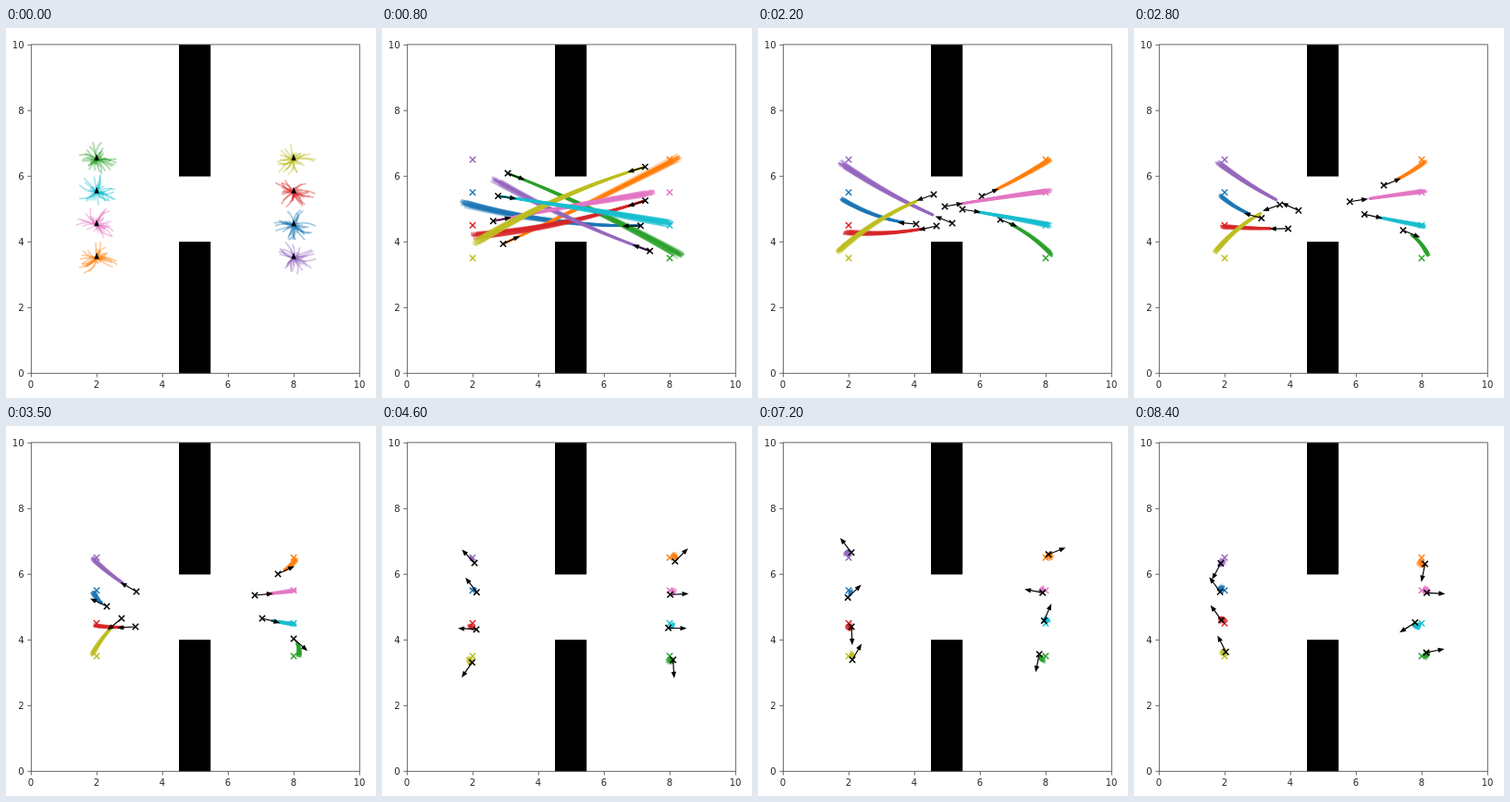
An HTML page with a canvas for the animation above (8500 ms loop, 400 by 400 pixels).

```html
<!DOCTYPE html>
<html lang="en">
<head>
<meta charset="utf-8">
<title>Robots swapping sides through a gap</title>
<style>
  html, body { margin: 0; width: 100%; height: 100%; overflow: hidden; background: #fff; }
  svg, canvas { position: absolute; left: 0; top: 0; width: 400px; height: 400px; }
  text { font: 10px "DejaVu Sans", sans-serif; fill: #2a2a2a; }
</style>
</head>
<body>
<svg id="axes" viewBox="0 0 400 400">
  <path d="M187 18h34.2v142.5H187zM187 231h34.2v142.5H187z"/>
  <rect x="27.3" y="17.9" width="355" height="355.4" fill="none" stroke="#555" stroke-width=".9"/>
</svg>
<canvas id="stage" width="400" height="400"></canvas>
<script>
const LOOP = 8500, STEP = 100, LINES = 30, ARROW = 20;
const ctx = document.getElementById('stage').getContext('2d');
const mix = (a, b, u) => a + (b - a) * u;
const clamp = (v, lo, hi) => Math.min(hi, Math.max(lo, v));
const plot = (x, y) => [27 + 35.5 * x, 373 - 35.5 * y];

function drawAxes() {
  let marks = '';
  for (let v = 0; v <= 10; v += 2) {
    const [x, y] = plot(v, v);
    marks += `<path d="M${x + .3} 373.5v4M27.3 ${y + .3}h-4" stroke="#555" stroke-width=".9"/>
      <text x="${x}" y="389" text-anchor="middle">${v}</text>
      <text x="19.5" y="${y + 3.6}" text-anchor="end">${v}</text>`;
  }
  document.getElementById('axes').insertAdjacentHTML('beforeend', marks);
}

function random(seed) {
  return () => {
    seed = (seed * 16807) % 2147483647;
    return seed / 2147483647;
  };
}

// Each robot crosses to the other side by way of two points, then hovers around its goal.
function robot(color, side, fromLane, toLane, inGap, beyond, index) {
  const rnd = random(4201 * (index + 2));
  const start = plot(side, fromLane), goal = plot(10 - side, toLane);
  const knots = [[0, start], [2200, inGap], [3500, beyond]];
  for (let t = 4600; t <= 8400; t += 950) {
    const a = rnd() * 2 * Math.PI, d = 4 + 4 * rnd();
    knots.push([t, [goal[0] + d * Math.cos(a), goal[1] + d * Math.sin(a)]]);
  }
  return { color, start, goal, knots };
}

const robots = [
  ['#1f77b4', 8, 4.5, 5.5, [171, 212], [109, 195]],
  ['#ff7f0e', 2, 3.5, 6.5, [242, 182], [294, 160]],
  ['#2ca02c', 2, 6.5, 3.5, [262, 207], [311, 230]],
  ['#d62728', 8, 5.5, 4.5, [193, 214], [140, 217]],
  ['#9467bd', 8, 3.5, 6.5, [210, 211], [141, 179]],
  ['#e377c2', 2, 4.5, 5.5, [202, 193], [269, 183]],
  ['#bcbd22', 8, 6.5, 3.5, [190, 180], [125, 208]],
  ['#17becf', 2, 5.5, 4.5, [221, 196], [277, 208]]
].map((spec, i) => robot(...spec, i));

// Smooth curve through the knots, at rest at the start
function positionAt({ knots }, t) {
  const last = knots.length - 1;
  let i = 0;
  while (i < last - 1 && t >= knots[i + 1][0]) i++;
  const [t0, p] = knots[i], [t1, q] = knots[i + 1];
  const u = clamp((t - t0) / (t1 - t0), 0, 1), v = 1 - u;
  const slope = (k, axis) => {
    if (k === 0) return 0;
    const [ta, a] = knots[k - 1], [tb, b] = knots[Math.min(last, k + 1)];
    return (b[axis] - a[axis]) / (tb - ta);
  };
  return [0, 1].map(axis =>
    p[axis] * (1 + 2 * u) * v * v + q[axis] * u * u * (3 - 2 * u) +
    (t1 - t0) * u * v * (slope(i, axis) * v - slope(i + 1, axis) * u));
}

function poseAt(r, t) {
  const [x, y] = positionAt(r, t);
  const [ax, ay] = positionAt(r, t - 20), [bx, by] = positionAt(r, t + 20);
  return { x, y, angle: Math.atan2(by - ay, bx - ax), speed: Math.hypot(bx - ax, by - ay) * 25 };
}

function cross([x, y], color) {
  const s = 3.2;
  ctx.strokeStyle = color;
  ctx.lineWidth = 1.5;
  ctx.beginPath();
  ctx.moveTo(x - s, y - s); ctx.lineTo(x + s, y + s);
  ctx.moveTo(x - s, y + s); ctx.lineTo(x + s, y - s);
  ctx.stroke();
}

function arrow(x, y, angle, length) {
  ctx.save();
  ctx.translate(x, y);
  ctx.rotate(angle);
  ctx.fillStyle = ctx.strokeStyle = '#000';
  ctx.lineWidth = 1.2;
  ctx.beginPath();
  ctx.moveTo(0, 0); ctx.lineTo(Math.max(0, length - 5), 0);
  ctx.stroke();
  ctx.beginPath();
  ctx.moveTo(length, 0); ctx.lineTo(length - 7, 2.7); ctx.lineTo(length - 7, -2.7);
  ctx.fill();
  ctx.restore();
}

function burst(r, index) {
  const rnd = random(977 * (index + 3));
  const [x, y] = r.start;
  ctx.strokeStyle = r.color;
  ctx.globalAlpha = .4;
  ctx.lineWidth = 1.7;
  for (let n = 0; n < LINES * 1.4; n++) {
    const a = rnd() * 2 * Math.PI, bend = a + (rnd() - .5) * 1.2, size = 5 + 18 * rnd() ** 1.3;
    ctx.beginPath();
    ctx.moveTo(x, y);
    ctx.quadraticCurveTo(x + size * .55 * Math.cos(bend), y + size * .5 * Math.sin(bend),
      x + size * 1.05 * Math.cos(a), y + size * .9 * Math.sin(a));
    ctx.stroke();
  }
  ctx.globalAlpha = 1;
}

// Predicted paths: they leave along the heading and bend towards the goal
function bundle(r, index, { x, y, angle, speed }, t) {
  const rnd = random(7919 * (index + 1) + t * 31);
  const gx = r.goal[0] - x, gy = r.goal[1] - y, distance = Math.hypot(gx, gy);
  const reach = Math.min(1.03 * distance, .5 * distance + 1.5 * speed);
  const aimX = mix(gx / distance, Math.cos(angle), .35), aimY = mix(gy / distance, Math.sin(angle), .35);
  const scale = reach / Math.max(.5, Math.hypot(aimX, aimY));
  const ex = x + aimX * scale, ey = y + aimY * scale;
  const lead = Math.max(6, reach / 2);
  const cx = x + lead * Math.cos(angle), cy = y + lead * Math.sin(angle);

  const unsettled = Math.max(0, 1 - t / 700) * 9;
  const spread = Math.max(1.8 + (reach / 150) ** 2, 4.2 - reach / 15) + unsettled;
  const stretch = 3 + reach / 18;
  const from = clamp((t - 1200) / 6000, 0, .3);
  const dir = Math.atan2(ey - cy, ex - cx);
  ctx.strokeStyle = r.color;
  ctx.globalAlpha = .35;
  ctx.lineWidth = 2;
  for (let n = 0; n < LINES; n++) {
    const across = (rnd() + rnd() - 1) * spread * 1.3, along = (rnd() - .5) * stretch;
    const dx = along * Math.cos(dir) - across * Math.sin(dir);
    const dy = along * Math.sin(dir) + across * Math.cos(dir);
    ctx.beginPath();
    for (let k = 0; k <= 14; k++) {
      const u = mix(from, 1, k / 14), v = 1 - u;
      ctx.lineTo(v * v * x + 2 * u * v * cx + u * u * ex + dx * u,
        v * v * y + 2 * u * v * cy + u * u * ey + dy * u);
    }
    ctx.stroke();
  }
  ctx.globalAlpha = 1;
}

function draw(t) {
  ctx.clearRect(0, 0, 400, 400);
  if (t === 0) {
    robots.forEach(burst);
    robots.forEach(r => arrow(...r.start, -Math.PI / 2, 6));
    return;
  }
  const poses = robots.map(r => poseAt(r, t));
  robots.forEach((r, i) => {
    bundle(r, i, poses[i], t);
    cross(r.goal, r.color);
    cross([poses[i].x, poses[i].y], '#000');
  });
  poses.forEach(p => arrow(p.x, p.y, p.angle, ARROW));
}

drawAxes();
draw(0);
const began = performance.now();
function tick() {
  const t = Math.max(0, performance.now() - began) % LOOP;
  draw(Math.floor(t / STEP) * STEP);
  requestAnimationFrame(tick);
}
requestAnimationFrame(tick);
</script>
</body>
</html>
```
